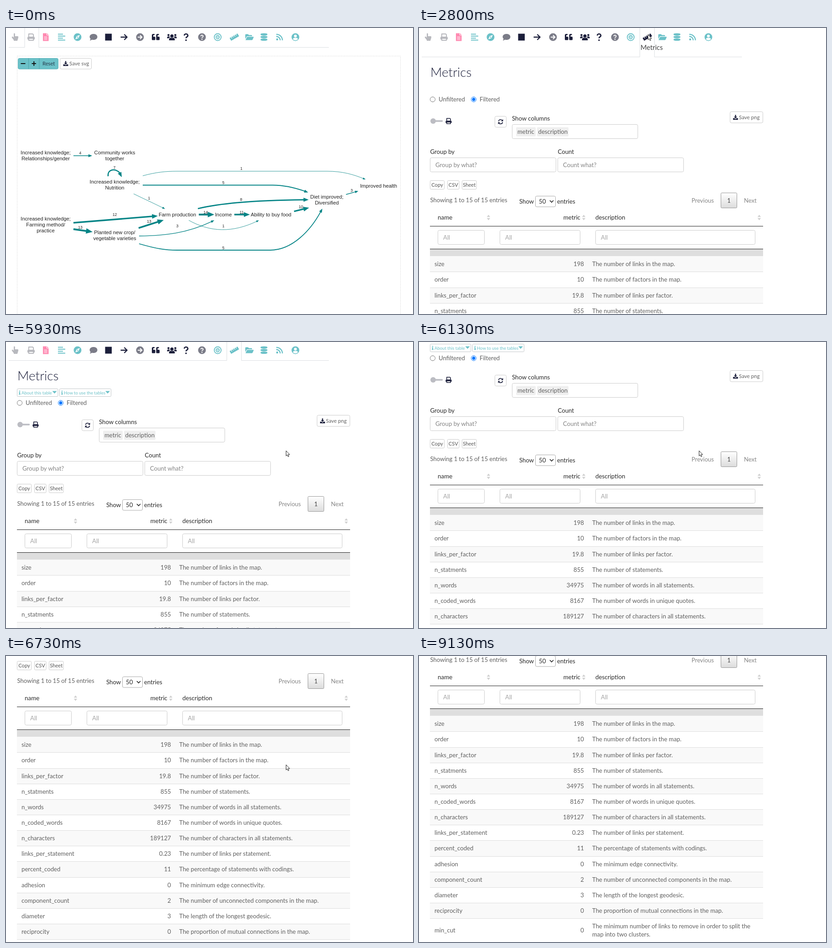
An HTML page for the animation above (9.74 s loop, 893x627 px).

```html
<!DOCTYPE html>
<html lang="en">
<head>
<meta charset="utf-8">
<title>Metrics tab</title>
<style>
html, body { margin: 0; width: 100%; height: 100%; overflow: hidden; background: #fff; }
svg { display: block; width: 893px; height: 627px; }
text { font-family: Lato, sans-serif; white-space: pre; }
#map text { font-family: "Liberation Sans", Arial, sans-serif; }
#map .ui { font-family: Lato, sans-serif; }
</style>
</head>
<body>
<svg id="stage" viewBox="0 0 893 627" xmlns="http://www.w3.org/2000/svg"></svg>
<script>
const DARK = '#1c1f3b', TEAL = '#6bc1c8', GREY = '#7b7c88', PALE = '#b8b9be',
      PINK = '#ff8bb2', EDGE = '#048486', BODY = '#606060', HEAD = '#2a2a2a', HINT = '#858585';
const LOOP = 9740, STEP = 1000 / 15;

// Drawing helpers
const text = (x, y, s, size = 13.2, fill = BODY, more = '') =>
  `<text x="${x}" y="${y}" font-size="${size}" fill="${fill}" ${more}>${s}</text>`;
const box = (x, y, w, h, fill = '#fff', stroke = '#ccc', r = 3) =>
  `<rect x="${x}" y="${y}" width="${w}" height="${h}" rx="${r}" fill="${fill}" stroke="${stroke}"/>`;
const fill = d => `<path d="${d}" stroke="none"/>`;
const line = (d, w = 2, more = '') => `<path d="${d}" fill="none" stroke-width="${w}" ${more}/>`;
const dot = (x, y, r) => `<circle cx="${x}" cy="${y}" r="${r}" stroke="none"/>`;
const ring = (r, w) => `<circle r="${r}" fill="none" stroke-width="${w}"/>`;
const paint = (c, s) => `<g fill="${c}" stroke="${c}">${s}</g>`;
const white = s => paint('#fff', s);
const END = 'text-anchor="end"', MID = 'text-anchor="middle"';

// Icons, centred on 0,0
const ico = {
  hand: fill('M-3-7a1.4 1.4 0 0 1 2.8 0v5H5.5q1.7 0 1.7 1.7L6 5l-.8 1.2V8H-3V6.2L-7 1.2q-.8-1.6.5-2.2t2 .3L-3 1z'),
  print: line('M-5-1V-7H3.5L5-5.5V-1') + fill('M-8 5V1q0-2 2-2H6q2 0 2 2v4H6V2.5H-6V5z') + line('M-5 2.7H5V7H-5z'),
  file: fill('M-6-8.5H2V-4H6.5V8.5H-6zM3-8.5L6.5-5H3z') + white(line('M-3.5-.5h7M-3.5 2.3h7M-3.5 5h7', 1.1)),
  list: line('M-8-6.5H3M-8-2.2H8M-8 2.2H3M-8 6.5H8', 2),
  compass: dot(0, 0, 8.5) + white(fill('M5-5L2 2-5 5-2-2z')) + dot(0, 0, 1.3),
  comment: fill('M0-7C5-7 8.5-4.3 8.5-.5S5 6 0 6q-2 0-3.5-.6Q-5.5 7.2-8.3 7.3-6.8 5.8-6.4 3.7-8.5 2-8.5-.5C-8.5-4.3-5-7 0-7z'),
  square: fill('M-7-7.5H7.5V7.5H-7z'),
  arrow: line('M-7.5 0H6M.5-6L6.5 0 .5 6', 2.3),
  arrowDisc: dot(0, 0, 8.5) + white(line('M-5 0H4M0-4.3L4.3 0 0 4.3', 2)),
  quote: [-8.5, 1].map(x => fill(`M${x + 1.5}-7H${x + 6}V-4.5H${x + 4}q-1 0-1 1.2V-1H${x + 6}q1.5 0 1.5 1.5V5q0 1.5-1.5 1.5H${x + 1.5}Q${x} 6.5 ${x} 5V-4Q${x}-7 ${x + 3}-7z`)).join(''),
  users: dot(0, -2.5, 3.6) + dot(-7.5, -4.5, 2.3) + dot(7.5, -4.5, 2.3) +
    fill('M-6.3 7V5q0-3.5 3.5-3.5H2.8Q6.3 1.5 6.3 5V7zM-10.5 2.5V.5Q-10.5-1.5-8-1.5h2.5L-4 .5q-2.5.5-3 2zM10.5 2.5V.5Q10.5-1.5 8-1.5H5.5L4 .5q2.5.5 3 2z'),
  ask: line('M-4-3.5Q-3.2-7 0-7T4-3.8Q4-1.5 1.8-.5 0 .3 0 2.5', 2.7) + dot(0, 6.7, 1.8),
  askDisc: dot(0, 0, 8.5) + white(line('M-2.6-2Q-2-4.3 0-4.3T2.6-2Q2.6-.6 1.2 0 0 .6 0 1.8', 1.8) + dot(0, 4.5, 1.3)),
  target: ring(7.5, 1.9) + ring(3.5, 1.9) + dot(0, 0, 1.3),
  ruler: `<g transform="rotate(-30)">${fill('M-10-3.5H10V3.5H-10z')}${white(line('M-6-4V0M-2-4V-.5M2-4V0M6-4V-.5', 1.2))}</g>`,
  folder: fill('M-9 4V-5q0-1.5 1.5-1.5h4.5l2 2H4.5Q6-4.5 6-3V-2H-4.5Q-5.5-2-6-1zM-8.5 6.5L-5.2-.2Q-4.9-.8-4-.8H8.5Q10-.8 9.3.5L7 5.5Q6.5 6.5 5.5 6.5z'),
  data: [-8.5, -2.8, 2.9].map(y => fill(`M-7.5 ${y + 2}Q-7.5 ${y} 0 ${y}T7.5 ${y + 2}V${y + 3.3}Q6 ${y + 5.2} 0 ${y + 5.2}T-7.5 ${y + 3.3}z`)).join(''),
  feed: dot(-5, 5, 2.2) + line('M-7-1.5A8.5 8.5 0 0 1 1.7 7M-7-6.2A13.2 13.2 0 0 1 6.5 7', 2.3),
  user: dot(0, 0, 8.5) + white(dot(0, -2.5, 3.1) + fill('M-5.5 4.8Q-4.5 1.5-2 1.5H2Q4.5 1.5 5.5 4.8 3 7 0 7T-5.5 4.8z')),
  save: fill('M-1.2-5.5H1.2V-1.5H3.7L0 2.2-3.7-1.5H-1.2zM-5.5 1.7H-2L0 3.7 2 1.7H5.5V5.2H-5.5z'),
  sync: line('M-4.5-1A4.6 4.6 0 0 1 4-2.5M4.5 1A4.6 4.6 0 0 1-4 2.5', 1.6) + fill('M5.5-5.5V-1H1zM-5.5 5.5V1H-1z'),
  sort: fill('M-3.7-1.2L0-6 3.7-1.2zM-3.7 1.2L0 6 3.7 1.2z'),
  info: dot(0, -3.4, 1.2) + fill('M-1.8-1.3H1V2.9H2V4.3H-2V2.9H-1V0H-1.8z')
};
const icon = (name, x, y, c, k = 1, id = '') =>
  `<g ${id && `id="${id}"`} transform="translate(${x} ${y}) scale(${k})" fill="${c}" stroke="${c}">${ico[name]}</g>`;

const bar = [
  ['hand', 20, PALE], ['print', 55, PALE], ['file', 87, PINK], ['list', 122, TEAL], ['compass', 157, TEAL],
  ['comment', 192, GREY], ['square', 224.5, DARK], ['arrow', 259, DARK], ['arrowDisc', 294, GREY],
  ['quote', 328.5, DARK], ['users', 364, DARK], ['ask', 395, DARK], ['askDisc', 430, GREY], ['target', 464.5, TEAL],
  ['ruler', 501, TEAL], ['folder', 534, TEAL], ['data', 566, TEAL], ['feed', 600, TEAL], ['user', 635, TEAL]
].map(([n, x, c]) => icon(n, x, 20, c, 1, n === 'ruler' ? 'ruler' : '')).join('');

// Causal map: path, line width, label, label position
const edges = [
  ['M148 280H189', 1.6, 4, 163, 277],
  ['M224 325C222 306 249 306 254 327', 2.6, 7, 238, 309],
  ['M300 324C330 316 350 314 375 314H705C740 314 765 322 789 332', .8, 1, 516.5, 311],
  ['M300 344.5H585C615 344.5 640 352 663 360.5', 1.8, 5, 477, 342],
  ['M280 363.5L349 396.5', .8, 1, 314, 376],
  ['M148 427L333 412', 3.3, 12, 238.5, 412],
  ['M148 441L190 447', 4, 13, 163, 440],
  ['M291 438.5L346 421', 3.7, 13, 314, 427],
  ['M421 396C480 382 560 377 664 376.5', 2.8, 8, 516, 379],
  ['M423 409H457', 4, 14, 438, 407],
  ['M501 409H535', 3.5, 11, 517, 407],
  ['M632 402L665 394', 3.3, 10, 647, 395],
  ['M292 456C350 455 400 450 457 421.5', 1.3, 3, 376, 437],
  ['M401 421.5C450 449 500 449 555 421.5', .8, 1, 477, 437],
  ['M292 473C330 484 350 487 375 487H580C630 487 672 440 694 396', 1.8, 5, 477, 485],
  ['M746 365L773 357.5', 1.3, 3, 758.5, 359]
];
const nodes = [
  [87, 277, 'Increased knowledge;', 'Relationships/gender'], [238.5, 277, 'Community works', 'together'],
  [238.5, 341, 'Increased knowledge;', 'Nutrition'], [87, 422, 'Increased knowledge;', 'Farming method/', 'practice'],
  [238.5, 452, 'Planted new crop/', 'vegetable varieties'], [376, 412.5, 'Farm production'],
  [477, 412.5, 'Income'], [581.5, 412.5, 'Ability to buy food'],
  [704, 374, 'Diet improved;', 'Diversified'], [817.5, 349.5, 'Improved health']
];

function arrow([d, w]) {
  const p = document.createElementNS('http://www.w3.org/2000/svg', 'path');
  p.setAttribute('d', d);
  const len = p.getTotalLength(), head = 4 + 2.6 * w, half = 1.3 + w * 1.15;
  const tip = p.getPointAtLength(len), back = p.getPointAtLength(len - head);
  const a = Math.atan2(tip.y - back.y, tip.x - back.x) * 180 / Math.PI;
  return line(d, w, `stroke-dasharray="${len - head + 1} 999"`) +
    `<path d="M0 0L${-head} ${-half}V${half}z" stroke="none" transform="translate(${tip.x} ${tip.y}) rotate(${a})"/>`;
}

const UI = 'class="ui"';
const mapPage =
  `<rect x="24.5" y="61.5" width="841" height="640" fill="none" stroke="#ddd" stroke-dasharray="2 1.5"/>` +
  box(26.5, 66.5, 88, 23.5, TEAL, '#58b3ba') + `<path d="M49.5 66V90M73 66V90" stroke="#4fa5ac"/>` +
  `<path d="M32.5 78H42.5M56.5 78H66M61.3 73V83" stroke="#111" stroke-width="2"/>` +
  text(80, 82, 'Reset', 11.2, '#26394a', UI) + box(118.5, 66.5, 69, 23.5) +
  icon('save', 131, 78, DARK) + text(139, 82, 'Save svg', 11.5, BODY, UI) +
  paint(EDGE, edges.map(arrow).join('')) +
  edges.map(e => text(e[3], e[4], e[2], 8.7, '#222', MID)).join('') +
  nodes.map(([x, y, ...rows]) => rows.map((s, i) => text(x, y + i * 13, s, 11.3, '#222', MID)).join('')).join('');

const rows = [
  ['size', '198', 'The number of links in the map.'], ['order', '10', 'The number of factors in the map.'],
  ['links_per_factor', '19.8', 'The number of links per factor.'], ['n_statments', '855', 'The number of statements.'],
  ['n_words', '34975', 'The number of words in all statements.'], ['n_coded_words', '8167', 'The number of words in unique quotes.'],
  ['n_characters', '189127', 'The number of characters in all statements.'],
  ['links_per_statement', '0.23', 'The number of links per statement.'],
  ['percent_coded', '11', 'The percentage of statements with codings.'], ['adhesion', '0', 'The minimum edge connectivity.'],
  ['component_count', '2', 'The number of unconnected components in the map.'],
  ['diameter', '3', 'The length of the longest geodesic.'],
  ['reciprocity', '0', 'The proportion of mutual connections in the map.']
];
const rowTop = i => Math.round(479.2 + 34.15 * i);
const tableRow = ([name, value, about], i) => {
  const y = rowTop(i), h = rowTop(i + 1) - y, b = y + 22.4;
  return `<rect x="24" y="${y}" width="731" height="${h}" fill="${i % 2 ? '#fff' : '#f9f9f9'}"/>` +
    (i ? `<path d="M24 ${y + .5}H755" stroke="#ddd"/>` : '') +
    text(34, b, name) + text(362, b, value, 13.2, BODY, END) + text(380, b, about);
};
const lastLine = rowTop(rows.length) + .5;

const tip = (x, w, s) => box(x, 104.5, w, 17, '#fff', '#c4c9cb', 2) + icon('info', x + 5.5, 113, TEAL) +
  text(x + 9.5, 116.5, s, 9.5, TEAL) + `<path d="M${x + w - 12.5} 109.5h10l-5 5.5z" fill="${TEAL}"/>`;
const field = (x, y, w, s, c = HINT) => box(x + .5, y + .5, w - 1, 31) + text(x + 12, y + 20.5, s, 13.2, c);
const small = (x, w, s) => box(x, 313.5, w, 19, '#fff', '#ccc', 2) + text(x + w / 2, 327, s, 11.2, '#555', MID);

const metricsPage =
  text(25, 86, 'Metrics', 28, DARK, 'font-weight="300"') +
  `<g id="tips">${tip(24.5, 89.5, 'About this table')}${tip(117.5, 113, 'How to use the tables')}</g>` +
  `<circle cx="30" cy="135.5" r="5.5" fill="#fff" stroke="#767676"/>` + text(43, 140, 'Unfiltered') +
  `<circle cx="120" cy="135.5" r="5.5" fill="#fff" stroke="#0075ff"/><circle cx="120" cy="135.5" r="3.5" fill="#0075ff"/>` +
  text(133, 140, 'Filtered') +
  paint('#bcbdc3', dot(31, 183, 6) + line('M31 183H50.5', 3.5, 'stroke-linecap="round"')) + icon('print', 65, 183, DARK, .82) +
  box(166.5, 172.5, 25, 24) + icon('sync', 179, 184.5, DARK) +
  text(204, 181.5, 'Show columns', 13.2, HEAD) + box(204.5, 190.5, 275.5, 31) +
  box(213, 196.5, 43, 20, '#efefef', 'none', 2) + box(259, 196.5, 69, 20, '#efefef', 'none', 2) +
  text(216, 211, 'metric') + text(261.5, 211, 'description') +
  box(682.5, 162.5, 72, 24.5) + icon('save', 694.5, 175, DARK) + text(702, 179, 'Save png', 11.5) +
  text(24.5, 254.5, 'Group by', 13.2, HEAD) + text(304.5, 254.5, 'Count', 13.2, HEAD) +
  field(24, 263, 277, 'Group by what?') + field(304, 263, 277, 'Count what?') +
  small(24.5, 31, 'Copy') + small(62.5, 25.5, 'CSV') + small(94.5, 31.5, 'Sheet') +
  text(24.5, 361, 'Showing 1 to 15 of 15 entries', 13) +
  text(220, 364, 'Show', 13.2, HEAD) + box(255.5, 347.5, 44, 23.5, '#fff', '#aaa') +
  text(263, 364, '50', 13.2, HEAD) + `<path d="M287 357l4 4 4-4" fill="none" stroke="#222" stroke-width="1.6"/>` +
  text(303, 364, 'entries', 13.2, HEAD) +
  text(598, 361.5, 'Previous', 13, HINT) + box(662.5, 340.5, 35, 33, 'url(#page)', '#979797', 2) +
  text(680, 361.5, '1', 13, '#444', MID) + text(713, 361.5, 'Next', 13, HINT) +
  text(41, 399, 'name', 13.4, HEAD) + text(354, 399, 'metric', 13.4, HEAD, END) + text(387, 399, 'description', 13.4, HEAD) +
  [152.5, 361.5, 746.5].map(x => icon('sort', x, 394.5, '#d0d0d0')).join('') +
  `<path d="M24 413.5H755" stroke="#222"/>` +
  field(41, 422, 103, 'All', '#a5a5a5') + field(177, 422, 177, 'All', '#a5a5a5') + field(387, 422, 351, 'All', '#a5a5a5') +
  `<rect x="24" y="464" width="731" height="15" fill="#dedede"/><path d="M24 463.5H755" stroke="#222"/>` +
  rows.map(tableRow).join('') + `<path d="M24 ${lastLine}H755" stroke="#ddd"/>` +
  text(34, 953.5, 'min_cut') + text(362, 953.5, '0', 13.2, BODY, END) +
  text(380, 944.5, 'The minimum number of links to remove in order to split the') + text(380, 962.5, 'map into two clusters.');

const el = id => document.getElementById(id);
el('stage').innerHTML =
  `<defs><linearGradient id="page" x2="0" y2="1"><stop stop-color="#fff"/><stop offset="1" stop-color="#dcdcdc"/></linearGradient></defs>
  <rect width="893" height="627" fill="#fff"/>
  <g id="scroll"><g id="map">${mapPage}</g><g id="metrics">${metricsPage}</g>
  <path id="tabs" fill="none" stroke="#dcdfe2"/>${bar}${text(486, 48, 'Metrics', 14.8, '#444', 'id="label"')}</g>
  <path id="cursor" d="M.5.5V11.8L3.1 9.4 4.9 13.6 6.7 12.8 5 8.8H8.5z" fill="#fff" stroke="#222" stroke-linejoin="round"/>`;

// Keys are [time, ...values]
const path = [
  [67, -6, 464], [930, 494, 232], [1333, 494, 232], [2267, 502, 14], [3267, 502, 14], [4267, 567, 206],
  [4600, 613, 237], [5000, 613, 237], [5067, 614, 238], [7667, 614, 238], [7733, 609, 240],
  [8267, 609, 240], [8530, 704, 318], [9133, 40, 632]
];
const scroll = [
  [5867, 0], [5933, 1.5], [6000, 35], [6067, 80], [6133, 100], [6200, 100], [6267, 112], [6400, 184],
  [6467, 208], [6533, 225], [6733, 302], [6867, 348]
];
const smooth = u => u * u * (3 - 2 * u);
function at(keys, t, ease = u => u) {
  const i = keys.findIndex(k => k[0] > t);
  if (i < 0) return keys[keys.length - 1].slice(1);
  if (i === 0) return keys[0].slice(1);
  const a = keys[i - 1], b = keys[i], u = ease((t - a[0]) / (b[0] - a[0]));
  return a.slice(1).map((v, j) => v + (b[j + 1] - v) * u);
}
const show = (id, on) => el(id).setAttribute('visibility', on ? 'visible' : 'hidden');
const move = (id, x, y) => el(id).setAttribute('transform', `translate(${Math.round(x)} ${Math.round(y)})`);

function draw(ms) {
  const t = Math.floor((ms + 4) / STEP) * STEP + .5;
  const [x, y] = at(path, t, smooth);
  const opened = t >= 2666, hover = t < 5000 && y < 50, drop = hover ? 21 : 0;
  const base = 42.5 + drop, [left, right] = opened ? [484.5, 516.5] : [41, 72];
  move('scroll', 0, -at(scroll, t)[0]);
  move('map', 0, drop);
  move('metrics', 0, drop);
  show('map', !opened);
  show('metrics', opened);
  el('metrics').setAttribute('opacity', Math.min(1, .35 + Math.max(0, t - 2667) / 200));
  show('tips', opened && !hover);
  show('label', hover);
  const tint = hover ? DARK : TEAL;
  el('ruler').setAttribute('fill', tint);
  el('ruler').setAttribute('stroke', tint);
  el('tabs').setAttribute('d', `M6 ${base}H${left}V0M${right} 0V${base}H708.5`);
  move('cursor', x, y);
  show('cursor', t > 130 && t < 9133);
}
const start = performance.now();
function tick() {
  draw((performance.now() - start) % LOOP);
  requestAnimationFrame(tick);
}
tick();
</script>
</body>
</html>
```
